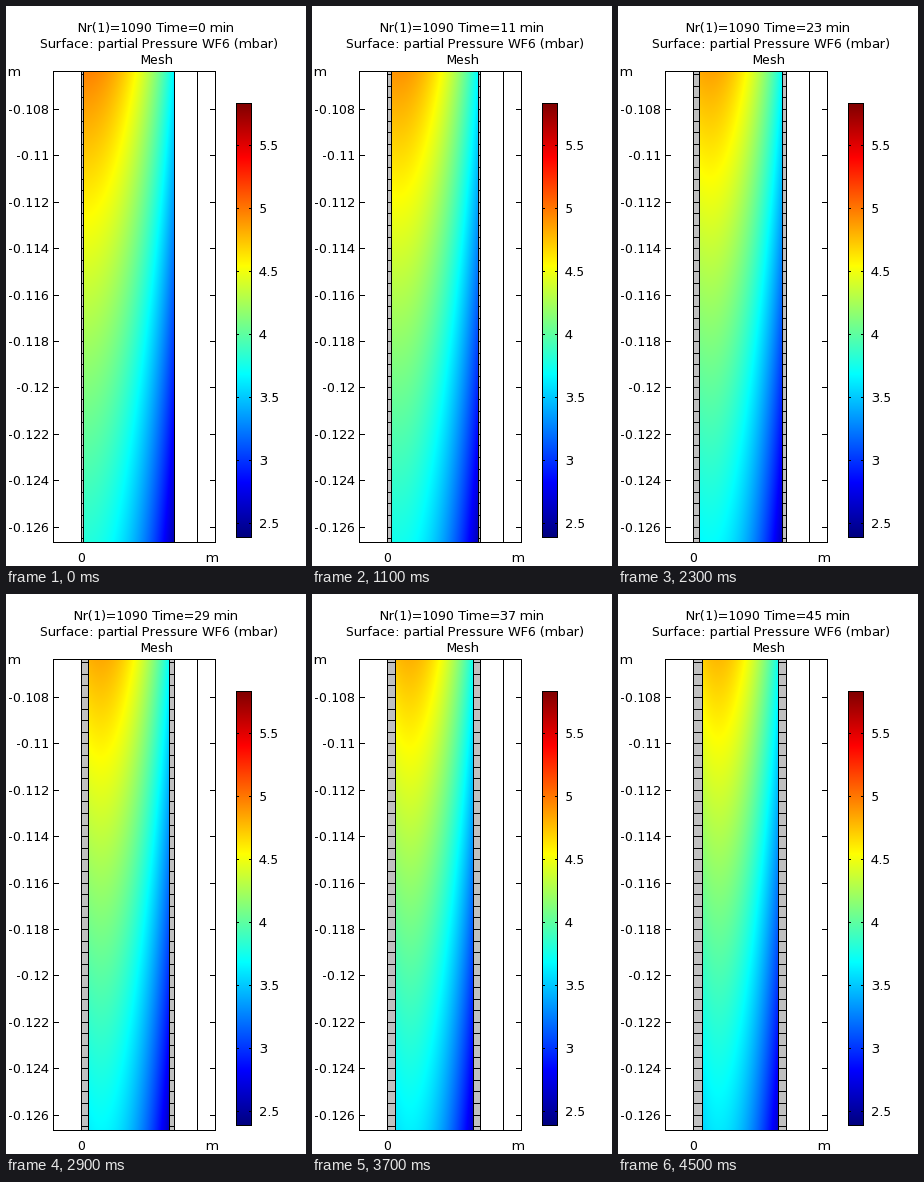
These frames come from a looping animation (300x560 px, 4.6 s). A matplotlib script:

```python
import numpy as np
import matplotlib.pyplot as plt
from matplotlib.animation import FuncAnimation
from matplotlib.collections import LineCollection
from matplotlib.patches import Rectangle

W, H, DPI = 300, 560, 100
FRAMES, STEP = 46, 100
PX = 72 / DPI

LEFT, RIGHT, TOP, BOTTOM = 47, 209, 65, 536
WALL_L, WALL_R, SHELL = 75, 168, 191
BAR_L, BAR_R, BAR_T, BAR_B = 230, 245, 97, 531
P_MIN, P_MAX = 2.389, 5.837
TICK_Y, TICK_STEP = 103, 46.4

plt.rcParams.update({
    "font.family": "DejaVu Sans",
    "font.size": 9,
    "text.hinting": "force_autohint",
    "text.hinting_factor": 1,
})

fig = plt.figure(figsize=(W / DPI, H / DPI), dpi=DPI, facecolor="white")
ax = fig.add_axes([0, 0, 1, 1])
ax.axis("off")


def rainbow(p):
    v = (p - P_MIN) / (P_MAX - P_MIN)
    bands = [np.clip(1.5 - np.abs(4 * v - c), 0, 1) for c in (3, 2, 1)]
    return np.stack(bands, axis=-1)


def line(x0, y0, x1, y1):
    # Whole coordinates snap to the pixel of that index.
    ax.plot([x0, x1], [y0, y1], color="black", lw=PX, antialiased=False,
            solid_capstyle="projecting", zorder=5)


def box(x0, y0, x1, y1):
    line(x0, y0, x1, y0)
    line(x0, y1, x1, y1)
    line(x0, y0, x0, y1)
    line(x1, y0, x1, y1)


def label(x, y, s, ha="center"):
    return ax.text(x, y, s, ha=ha, va="baseline", color="black")


def walls(t):
    """Inner edges of the two growing layers."""
    return 77 + t / 6, WALL_R - 0.178 * t


def pressure(t):
    xl, xr = walls(t)
    x = np.arange(WALL_L, WALL_R) + .5
    u = ((np.arange(TOP, BOTTOM) + .5 - TOP) / (BOTTOM - TOP))[:, None]
    s = np.clip((x - xl) / (xr - xl), 0, 1)[None, :]
    tau = t / (FRAMES - 1)
    core = 4.97 - .07 * tau - 1.17 * (u + .25 * u * (1 - u))
    edge = 3.65 + .1 * tau - 1.1 * u
    dip = .2 * tau * (1 - s) ** 4
    return core + (edge - core) * s ** 2.1 - dip


def image(rgb, x0, x1, y0, y1):
    return ax.imshow(rgb, extent=(x0, x1, y1, y0), aspect="auto",
                     interpolation="nearest", zorder=1)


field = image(rainbow(pressure(0)), WALL_L, WALL_R, TOP, BOTTOM)
scale = np.linspace(P_MAX, P_MIN, BAR_B - BAR_T)[:, None]
image(rainbow(np.repeat(scale, 2, axis=1)), BAR_L, BAR_R, BAR_T, BAR_B)
ax.set_xlim(0, W)
ax.set_ylim(H, 0)

# Plot frame and axis ticks
box(LEFT, TOP, RIGHT, BOTTOM)
line(SHELL, TOP, SHELL, BOTTOM)
for k in range(10):
    y = round(TICK_Y + TICK_STEP * k)
    line(LEFT, y, LEFT + 5, y)
    line(RIGHT - 5, y, RIGHT, y)
    label(43, y + 5, f"{-0.108 - .002 * k:.3f}".rstrip("0"), "right")
line(WALL_L, BOTTOM - 5, WALL_L, BOTTOM)
line(WALL_L, TOP, WALL_L, TOP + 5)
label(75, 556, "0")
label(1, 70, "m", "left")
label(199, 556, "m", "left")

# Colour bar
box(BAR_L, BAR_T, BAR_R, BAR_B)
for k in range(7):
    y = 139 + 63 * k
    line(BAR_L, y, BAR_L + 2, y)
    line(BAR_R - 2, y, BAR_R, y)
    label(253, y + 5, f"{5.5 - .5 * k:g}", "left")

title = label(150.5, 26, "")
label(153, 42, "Surface: partial Pressure WF6 (mbar)")
label(150.5, 58, "Mesh")

# Meshed layers on both sides of the gas, four cells per axis tick
layers = [Rectangle((0, TOP), 1, BOTTOM - TOP, fc="#c0c0c0", ec="black",
                    lw=PX, antialiased=False, zorder=3) for _ in range(2)]
for layer in layers:
    ax.add_patch(layer)
rungs = LineCollection([], colors="black", linewidths=PX,
                       antialiaseds=False, zorder=4)
ax.add_collection(rungs)
rung_y = np.round(TICK_Y + TICK_STEP / 4 * np.arange(-3, 38))


def draw(t):
    xl, xr = (round(x) for x in walls(t))
    title.set_text(f"Nr(1)=1090 Time={t} min")
    field.set_data(rainbow(pressure(t)))
    segments = []
    for layer, a, b in zip(layers, (WALL_L, xr), (xl, WALL_R)):
        layer.set_x(a)
        layer.set_width(b - a)
        segments += [[(a, y), (b, y)] for y in rung_y]
    rungs.set_segments(segments)
    return [title, field, rungs, *layers]


anim = FuncAnimation(fig, draw, frames=FRAMES, interval=STEP,
                     repeat=True, repeat_delay=0, blit=False)
plt.show()
```
